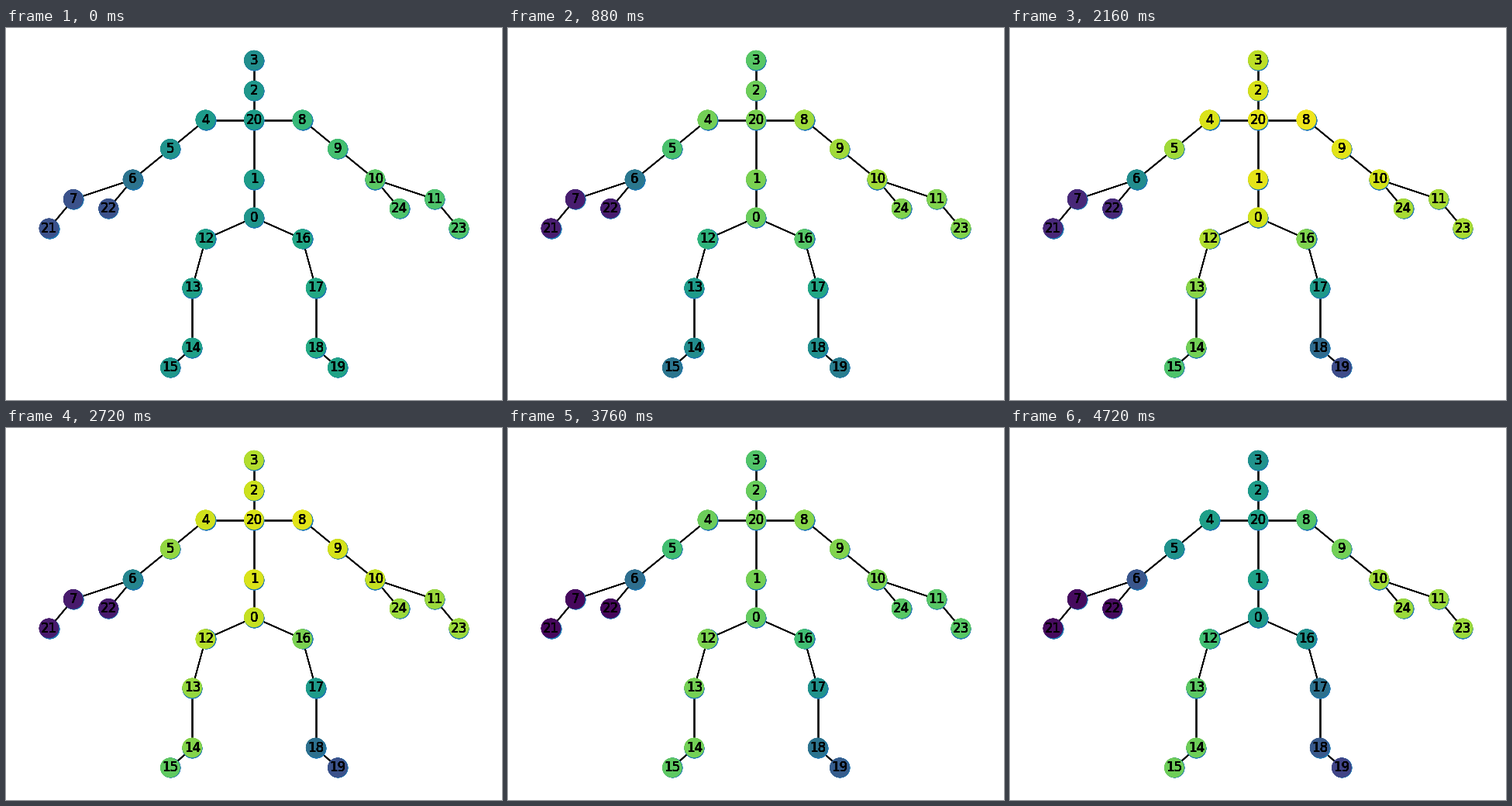
A matplotlib script that plays this animation: 640 px wide and 480 px high, repeating every 4.8 s.

```python
import numpy as np
import matplotlib.pyplot as plt
from matplotlib.animation import FuncAnimation
from matplotlib.collections import LineCollection

W, H, DPI = 640, 480, 100
FRAMES, INTERVAL = 60, 80
PASSES = 8  # stacked layers harden the antialiased edges

# Outlines as (distance from the centre line, y), from root to tip;
# the last arm point is the thumb, which branches off at the wrist.
ARM = [(62.5, 118.5), (108, 156), (156.4, 195.5), (233.2, 221),
       (264.46, 258.5), (187.7, 233)]
LEG = [(62.5, 272.3), (79.7, 335.5), (79.7, 412.6), (108, 438.35)]

# Spine joint: (y, level below the trunk).
SPINE = {3: (41.65, .06), 2: (81, .02), 20: (118.5, 0), 1: (195.5, 0),
         0: (244.5, .03)}

# Activation of the trunk and of the limb tips at the key times (ms).
KEY_TIMES = [0, 880, 1440, 2160, 3200, 3760, 4720]
TRUNK = [.55, .80, .94, .96, .93, .79, .57]

# Each limb: side, outline, root, joints, tip activation, pull of the tip
# on each joint, lift of the joints between trunk and tip.
LIMBS = [
    (-1, ARM, 20, [4, 5, 6, 7, 21, 22],
     [.25, .08, .05, .11, .04, .02, .03], [.02, .12, .56, 1, 1, 1], 0),
    (1, ARM, 20, [8, 9, 10, 11, 23, 24],
     [.72, .81, .75, .87, .83, .74, .85], [.4, .6, .85, 1, 1, 1], .05),
    (-1, LEG, 0, [12, 13, 14, 15],
     [.53, .39, .76, .72, .79, .75, .78], [.45, .7, .85, 1], .03),
    (1, LEG, 0, [16, 17, 18, 19],
     [.58, .42, .27, .23, .27, .29, .20], [.25, .62, .88, 1], .03),
]


def build_skeleton():
    pos = {j: (W / 2, y) for j, (y, _) in SPINE.items()}
    spine = list(SPINE)
    bones = list(zip(spine, spine[1:]))
    for side, outline, root, joints, *_ in LIMBS:
        for j, (dx, y) in zip(joints, outline):
            pos[j] = (W / 2 + side * dx, y)
        chain = [root] + joints[:5]
        bones += zip(chain, chain[1:])
        if outline is ARM:
            bones.append((joints[2], joints[5]))
    return np.array([pos[j] for j in range(len(pos))]), bones


def levels_at(ms):
    level = np.zeros(len(points))
    trunk = np.interp(ms, KEY_TIMES, TRUNK)
    for j, (_, drop) in SPINE.items():
        level[j] = trunk - drop
    for _, _, _, joints, tip, pull, lift in LIMBS:
        end = np.interp(ms, KEY_TIMES, tip)
        for j, p in zip(joints, pull):
            level[j] = trunk + (end - trunk) * p + lift * (p < 1)
    return level


fig = plt.figure(figsize=(W / DPI, H / DPI), dpi=DPI, facecolor="white")
ax = fig.add_axes([0, 0, 1, 1])
ax.set_xlim(0, W)
ax.set_ylim(H, 0)
ax.axis("off")

points, bones = build_skeleton()
segments = [points[[a, b]] for a, b in bones]
layers = []
for _ in range(PASSES):
    ax.add_collection(LineCollection(segments, colors="black",
                                     linewidths=1, zorder=1))
    ax.scatter(*points.T, s=300, c="#1f78b4", zorder=2)
    layers.append(ax.scatter(*points.T, s=300, c=levels_at(0),
                             cmap="viridis", vmin=0, vmax=1, zorder=2))
    for joint, (x, y) in enumerate(points):
        ax.text(x, y, str(joint), fontsize=12, family="DejaVu Sans",
                color="black", ha="center", va="center", zorder=3)


def update(frame):
    level = levels_at(frame * INTERVAL)
    for layer in layers:
        layer.set_array(level)
    return layers


anim = FuncAnimation(fig, update, frames=FRAMES, interval=INTERVAL,
                     repeat=True, repeat_delay=0, blit=False)
plt.show()
```
